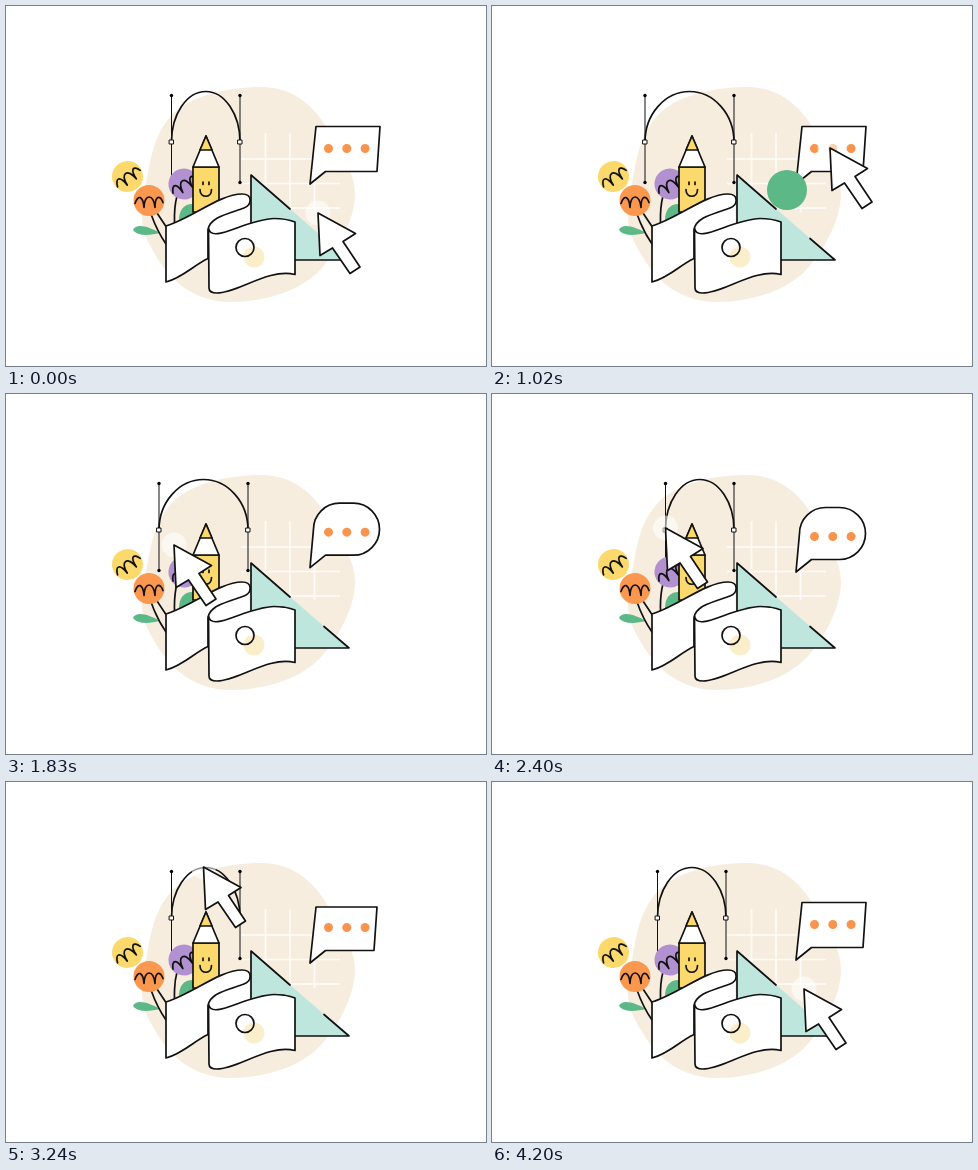
Recreate the animation shown at these times as an HTML page. Size 480 px wide and 360 px high, loop 4.23 s.

```html
<!DOCTYPE html>
<html lang="en">
<head>
<meta charset="utf-8">
<title>Design tools</title>
<style>
html, body { margin: 0; width: 100%; height: 100%; overflow: hidden; background: #fff; }
svg { display: block; width: 480px; height: 360px; }
.ink { fill: none; stroke: #111; stroke-width: 1.7; stroke-linejoin: round; stroke-linecap: round; }
.paper { fill: #fff; }
.yellow { fill: #fbd96c; }
.orange { fill: #fa9850; }
.purple { fill: #b191d0; }
.green { fill: #5cb886; }
.thin { stroke-width: 1; }
</style>
</head>
<body>
<svg viewBox="0 0 480 360">
  <defs>
    <path id="petals" class="ink" d="M-14 3C-11 -6 -6 -5 -5 7C-5 -7 5 -7 6 7C6 -5 11 -6 14 2"/>
    <circle id="bloom" r="15.5"/>
    <g id="handle">
      <path class="ink thin" d="M0 89.5V176.5"/>
      <circle cy="89.5" r="1.7"/><circle cy="176.5" r="1.7"/>
      <rect class="ink paper thin" x="-2" y="134" width="4" height="4"/>
    </g>
  </defs>

  <path fill="#f7eddf" d="M255 81C290 81 312 104 324 128S349 165 349 188S335 240 316 262S260 296 225 296S166 277 150 250S134 215 139 185S147 130 165 110S220 81 255 81Z"/>
  <path id="grid" stroke="#fff" stroke-width="1.6" opacity=".85"/>

  <path fill="#bfe6dd" d="M245 169L343 254H245Z"/>
  <path class="ink" d="M245 254V169L284 203M318 232.5L343 254H245"/>

  <path id="arch" class="ink"/>
  <use id="left" href="#handle"/>
  <use id="right" href="#handle"/>

  <path class="ink" d="M171 190Q168 201 168.500 217"/>
  <path class="green" d="M173 214C173 203 179 197 188 198V212Z"/>
  <g transform="translate(178 178) rotate(-28)"><use href="#bloom" class="purple"/><use href="#petals"/></g>

  <path id="body" class="ink yellow"/>
  <g id="tip">
    <path class="ink paper" d="M200 130L213 161H187Z"/>
    <path class="ink yellow" d="M200 130L206 144H194Z"/>
  </g>
  <g id="face">
    <path class="ink" d="M194 183.5C194 192.5 205.5 192.5 205.5 183.5"/>
    <path id="open" class="ink" stroke-linecap="round" d="M197 176v2.500M203 176v2.500"/>
    <path id="shut" class="ink" d="M193.500 176q2.500 2 5 0M201.500 176q2.500 2 5 0"/>
  </g>

  <path class="green" d="M127 224C130 217 142 220 154 227C145 229 132 231 127 224Z"/>
  <path class="ink" d="M145 208Q151 225 160 238M151 207L161 222"/>
  <g transform="translate(121.5 170.5) rotate(-34)"><use href="#bloom" class="yellow"/><use href="#petals"/></g>
  <g transform="translate(143 194.5)"><use href="#bloom" class="orange"/><use href="#petals"/></g>

  <path class="paper" d="M202 224L215 208L243 198L244 222L210 232Z"/>
  <path class="ink paper" d="M160 220C186 212 214 188 236 188C247 188 246 199 238 202C225 207 203 211 202 224V252.5C188 259 176 272 160 276Z"/>
  <path class="ink paper" d="M202.5 222C205 239 240 213 268 212.500Q280 212.500 289 216V268.500C262 262 232 287 211 287Q203 287 203 282Z"/>
  <circle cx="248" cy="251" r="10.5" fill="#fbeecb"/>
  <circle class="ink" cx="239" cy="241.500" r="9"/>

  <g id="bubble">
    <path id="shell" class="ink paper"/>
    <path d="M322.500 142.500h37" stroke="#f9944f" stroke-width="9" stroke-linecap="round" stroke-dasharray="0 18.300"/>
  </g>
  <circle id="ball" class="green"/>
  <g id="cursor">
    <circle r="12.5" fill="#fff" opacity=".55"/>
    <path class="ink paper" d="M0 0L37.500 20.500L25 28.500L42 54L32 60.500L14.500 35L2 42.500Z"/>
  </g>
</svg>
<script>
const LOOP = 4230;
const $ = id => document.getElementById(id);
const set = (id, attrs) => { for (const k in attrs) $(id).setAttribute(k, attrs[k]); };
const shift = (id, x, y) => set(id, { transform: `translate(${x} ${y})` });
const mix = (a, b, p) => a + (b - a) * p;

// Smooth step from 0 at time a to 1 at time b.
function ease(t, a, b) {
  const u = Math.min(1, Math.max(0, (t - a) / (b - a)));
  return u * u * (3 - 2 * u);
}
const pulse = (t, a, b, c, d) => ease(t, a, b) - ease(t, c, d);

const home = { x: 312, y: 207 };
const moves = [
  { from: 80, to: 420, x: 270, y: 146 },
  { from: 480, to: 760, x: 315, y: 204 },
  { from: 780, to: 1020, x: 338, y: 142 },
  { from: 1020, to: 1200, x: 350, y: 138 },
  { from: 1330, to: 1830, x: 168, y: 151 },
  { from: 1830, to: 2000, x: 153, y: 136 },
  { from: 2080, to: 2380, x: 173.5, y: 134 },
  { from: 2500, to: 2880, x: 206, y: 85 },
  { from: 2960, to: 3240, x: 197.5, y: 85 },
  { from: 3340, to: 4200, ...home }
];

function moveCursor(t) {
  let { x, y } = home;
  for (const m of moves) {
    const p = ease(t, m.from, m.to);
    x = mix(x, m.x, p);
    y = mix(y, m.y, p);
  }
  shift('cursor', x, y);
}

function drawArch(t) {
  const widen = ease(t, 300, 750), slide = ease(t, 2960, 3240);
  const l = 165.5 - 12.5 * widen + 20.5 * ease(t, 2080, 2380) - 8 * slide;
  const r = 234 + 8 * ease(t, 380, 750) - 8 * slide;
  const top = 85.500 - 4.5 * pulse(t, 280, 420, 560, 760);
  const mid = (l + r) / 2, bend = (r - l) * .275, side = mix(136, top, .55);
  set('arch', { d: `M${l} 136C${l} ${side} ${mid - bend} ${top} ${mid} ${top}S${r} ${side} ${r} 136` });
  shift('left', l, 0);
  shift('right', r, 0);
}

function drawPencil(t) {
  const lift = 44.5 * pulse(t, 120, 400, 560, 820), asleep = lift > 20;
  set('body', { d: `M187 ${161 - lift}H213V206H187Z` });
  shift('tip', 0, -lift);
  shift('face', 0, -lift * .95);
  set('open', { opacity: +!asleep });
  set('shut', { opacity: +asleep });
}

// Speech bubble that morphs between a pointed and a round outline.
function drawBubble(t) {
  const p = pulse(t, 1240, 1500, 2850, 3150);
  const squash = pulse(t, 3050, 3200, 3260, 3500);
  const r = 26 * p, k = r * .45, bottom = 165.5;
  const left = mix(310, 307.5, p), top = mix(120.5, 113.5, p) + 1.5 * squash;
  const right = mix(374, 373.5, p) - 3 * squash, foot = right - 3 * (1 - p);
  set('shell', { d: `M304 178L${left} ${top + r}C${left} ${top + k} ${left + k} ${top} ${left + r} ${top}`
    + `H${right - r}C${right - k} ${top} ${right} ${top + k} ${right} ${top + r}`
    + `L${foot} ${bottom - r}C${foot} ${bottom - k} ${foot - k} ${bottom} ${foot - r} ${bottom}H319.5Z` });
  shift('bubble', 0, 3 * squash - 4.5 * pulse(t, 1240, 1560, 1750, 2400));
}

function drawBall(t) {
  const size = 20 * pulse(t, 480, 760, 1300, 1500);
  const corner = t < 1000 ? size - 20 : 0; // drawn from its top left corner
  set('ball', { cx: 295 + corner, cy: 184 + corner, r: size });
}

set('grid', { d: [0, 1, 2].map(i => `M${259.5 + 24.5 * i} 127v79M235 ${153 + 24.5 * i}h99`).join('') });

const start = performance.now();
function tick() {
  const t = (performance.now() - start) % LOOP;
  [moveCursor, drawArch, drawPencil, drawBubble, drawBall].forEach(part => part(t));
  requestAnimationFrame(tick);
}
tick();
</script>
</body>
</html>
```
